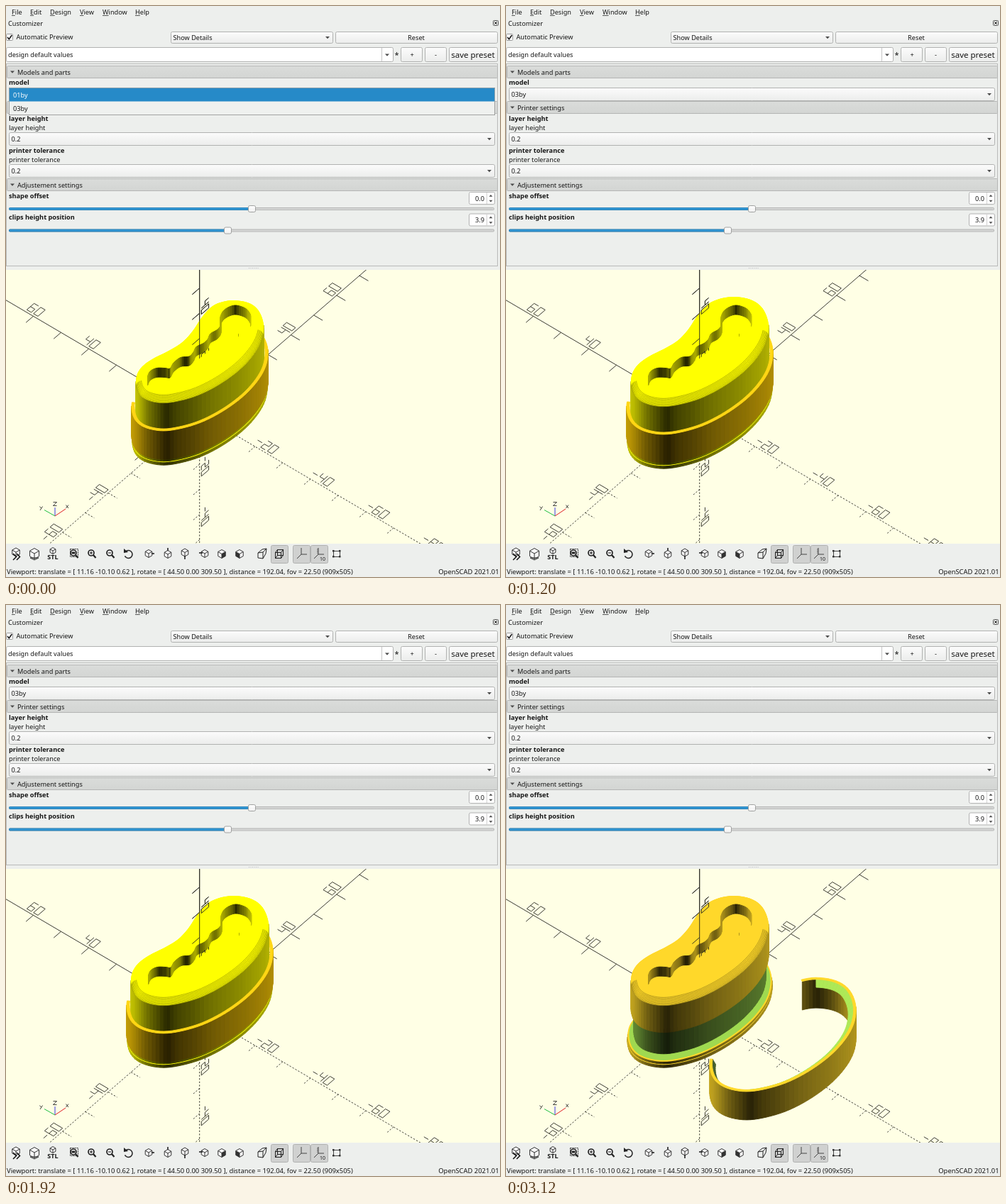
These frames come from a looping animation (696x805 px, 3.6 s). An HTML page with a canvas:

```html
<!DOCTYPE html>
<html lang="en">
<head>
<meta charset="utf-8">
<title>Customizer</title>
<style>
html, body { margin: 0; width: 100%; height: 100%; overflow: hidden; background: #edefed; }
canvas { display: block; }
</style>
</head>
<body>
<canvas id="stage" width="696" height="805"></canvas>
<script>
const ctx = document.getElementById('stage').getContext('2d');
const FONT = '"Noto Sans", "Open Sans", sans-serif';
const INK = '#161616', BLUE = '#268ac8', PANEL = '#edefed';

// ---------- drawing helpers ----------
function text(s, x, y, { size = 9.19, bold = false, color = INK, align = 'left' } = {}) {
  ctx.font = `${bold ? 'bold ' : ''}${size}px ${FONT}`;
  ctx.textAlign = align;
  ctx.fillStyle = color;
  ctx.fillText(s, x, y);
}
function rect(x, y, w, h, color) {
  ctx.fillStyle = color;
  ctx.fillRect(x, y, w, h);
}
function poly(pts, fill, stroke, width = 1, close = true) {
  ctx.beginPath();
  pts.forEach(([x, y], i) => i ? ctx.lineTo(x, y) : ctx.moveTo(x, y));
  if (close) ctx.closePath();
  if (fill) { ctx.fillStyle = fill; ctx.fill(); }
  if (stroke) { ctx.strokeStyle = stroke; ctx.lineWidth = width; ctx.stroke(); }
}
const line = (pts, color = INK, width = 1) => poly(pts, null, color, width, false);
function disc(x, y, r, fill, stroke, width = 1) {
  ctx.beginPath();
  ctx.arc(x, y, r, 0, 7);
  if (fill) { ctx.fillStyle = fill; ctx.fill(); }
  if (stroke) { ctx.strokeStyle = stroke; ctx.lineWidth = width; ctx.stroke(); }
}
function box(x, y, w, h, top, bottom = top, border = '#b1b2b1', r = 2) {
  const g = ctx.createLinearGradient(0, y, 0, y + h);
  g.addColorStop(0, top);
  g.addColorStop(1, bottom);
  ctx.beginPath();
  ctx.roundRect(x + .5, y + .5, w - 1, h - 1, r);
  ctx.fillStyle = g;
  ctx.fill();
  ctx.strokeStyle = border;
  ctx.lineWidth = 1;
  ctx.stroke();
}
const button = (x, y, w, h) => box(x, y, w, h, '#fcfcfc', '#ebeceb');
const arrow = (x, y, r = 3, d = 1) =>
  poly([[x - r, y - r * .5 * d], [x + r, y - r * .5 * d], [x, y + r * .6 * d]], '#4c4c4c');

// ---------- settings panel ----------
function combo(x, y, w, h, label) {
  button(x, y, w, h);
  text(label, x + 3.5, y + h / 2 + 3.5);
  arrow(x + w - 8, y + h / 2);
}
function header(y, label) {
  box(1, y, 692, 18, '#dadcda', '#d3d5d3', '#b4b5b4', 1);
  arrow(9, y + 9);
  text(label, 16, y + 12.5);
}
function slider(y, value, knob) {
  box(4, y - 2, 684, 4, '#d2d3d2', '#dcdddc', '#b4b5b4', 1);
  box(4, y - 2, knob - 4, 4, '#3ba3e0', BLUE, '#2b82b8', 1);
  box(knob - 5, y - 5, 11, 10, '#ffffff', '#f0f0f0', '#a0a1a0');
  box(652, y - 24, 37, 18, '#ffffff');
  line([[677.5, y - 23], [677.5, y - 7]], '#d0d0d0');
  text(value, 674, y - 11.5, { align: 'right' });
  arrow(683, y - 18.5, 2.5, -1);
  arrow(683, y - 11, 2.5);
}
function drawPanel(step) {
  rect(0, 0, 696, 372, PANEL);
  [['File', 8], ['Edit', 34], ['Design', 62], ['View', 104], ['Window', 136], ['Help', 182]]
    .forEach(([s, x]) => {
      text(s, x, 11.5);
      rect(x, 13, ctx.measureText(s[0]).width, .7, INK);
    });
  text('Customizer', 3, 27.5);
  box(686, 20, 8, 8, PANEL, PANEL, '#555', 1);
  line([[688, 22], [692, 26]]);
  line([[692, 22], [688, 26]]);

  box(0, 39, 10, 10, '#ffffff', '#ffffff', '#999', 1);
  line([[2, 44], [4.3, 46.7], [8.3, 41]], INK, 1.6);
  text('Automatic Preview', 14.5, 47.3);
  combo(232, 36, 229, 17, 'Show Details');
  button(464, 36, 229, 17);
  text('Reset', 578, 47.5, { align: 'center' });

  box(0, 58, 546, 21, '#ffffff');
  line([[529.5, 59], [529.5, 78]], '#c4c5c4');
  arrow(537, 69);
  text('design default values', 3, 72);
  text('*', 547.5, 73, { size: 11 });
  button(556, 58, 31, 21);
  button(590, 58, 31, 21);
  button(624, 58, 69, 21);
  text('+', 572, 72, { align: 'center' });
  text('-', 605.5, 72, { align: 'center' });
  text('save preset', 658, 73, { size: 11.5, align: 'center' });

  ctx.strokeStyle = '#b9bab9';
  ctx.lineWidth = 1;
  ctx.strokeRect(.5, 81.5, 692, 285);
  header(84, 'Models and parts');
  text('model', 4, 111.3, { bold: true });
  combo(4, 115, 685, 19, '03by');
  header(134, 'Printer settings');
  [['layer height', 162], ['printer tolerance', 207]].forEach(([s, y]) => {
    text(s, 4, y, { bold: true });
    text(s, 4, y + 13);
    combo(4, y + 16, 685, 19, '0.2');
  });
  header(243, 'Adjustement settings');
  text('shape offset', 4, 270.7, { bold: true });
  slider(286, '0.0', 346);
  text('clips height position', 4, 301.3, { bold: true });
  slider(316.5, '3.9', 312);
  for (let x = 342; x < 355; x += 2.5) rect(x, 369, 1, 1, '#bbb');

  if (step === 0) {
    rect(4, 115, 685, 39, '#8f908f');
    rect(4.8, 115.8, 683.4, 37.4, '#eff1ef');
    rect(4.8, 115.8, 683.4, 18.7, BLUE);
    text('01by', 10, 128.5, { color: '#fff' });
    text('03by', 10, 147.5);
  }
}

// ---------- axes, orthographic view ----------
const SQUASH = .7133, ORIGIN = [272.7, 575.1];
const X = [3.218, -2.785], Y = [-3.904, -2.296], Z = [0, -3.547];
const AXES = [{ dir: X, up: Y, read: 1 }, { dir: Y, up: X, read: -1 }, { dir: Z, up: X, read: -1 }];
const GLYPHS = { 0: '01540', 2: '013245', 4: '023 15', 6: '104532', 8: '01540 23', '-': '23' };
const AXIS_INK = '#25251f';
const at = ({ dir, up }, a, h) => [0, 1].map(k => ORIGIN[k] + dir[k] * a + up[k] * h);

function axisLabel(axis, value) {
  const chars = String(value), width = chars.length * 2.4 - .8;
  const low = value > 0 ? value - 1 : value + 1 - width;
  const start = axis.read > 0 ? low : low + width;
  [...chars].forEach((c, n) => GLYPHS[c].split(' ').forEach(run =>
    line([...run].map(v =>
      at(axis, start + axis.read * (n * 2.4 + v % 2 * 1.6), 4 - (v >> 1) * 1.6)), AXIS_INK, .9)));
}
function drawAxes() {
  for (const axis of AXES) for (const sign of [1, -1]) {
    const dash = sign > 0 ? [] : [2.3, 2.3];
    ctx.setLineDash(dash);
    line([at(axis, 0, 0), at(axis, sign * 190, 0)], AXIS_INK, .9);
    for (let i = 10; i < 190; i += 10) {
      ctx.setLineDash(dash);
      line([at(axis, sign * i, 0), at(axis, sign * i, -3.2)], AXIS_INK, .9);
      ctx.setLineDash([]);
      if (i % 20 === 0 && i < 100) axisLabel(axis, sign * i);
    }
  }
}
// The part of the vertical axis that stands out of the top face.
function drawAxisAboveModel() {
  const z = AXES[2];
  ctx.save();
  ctx.beginPath();
  [at(z, 22, -6), at(z, 22, 8), at(z, 70, 8), at(z, 70, -6)].forEach(p => ctx.lineTo(...p));
  ctx.clip();
  line([at(z, 22, 0), at(z, 70, 0)], AXIS_INK, .9);
  for (const i of [30, 40, 50]) line([at(z, i, 0), at(z, i, -3.2)], AXIS_INK, .9);
  axisLabel(z, 20);
  axisLabel(z, 40);
  ctx.restore();
}

// ---------- model ----------
const PER = 5;
function spline(pts, closed) {
  const n = pts.length, out = [];
  const get = i => pts[closed ? (i + n) % n : Math.max(0, Math.min(n - 1, i))];
  for (let i = 0; i < (closed ? n : n - 1); i++) for (let s = 0; s < PER; s++) {
    const t = s / PER, [a, b, c, d] = [-1, 0, 1, 2].map(k => get(i + k));
    out.push([0, 1].map(k => b[k] + .5 * t * (c[k] - a[k] +
      t * (2 * a[k] - 5 * b[k] + 4 * c[k] - d[k] + t * (3 * (b[k] - c[k]) + d[k] - a[k])))));
  }
  if (!closed) out.push(pts[n - 1]);
  return out;
}
function withNormals(pts, closed) {
  const n = pts.length;
  return pts.map(([x, y], i) => {
    const p = pts[closed ? (i + n - 1) % n : Math.max(0, i - 1)];
    const q = pts[closed ? (i + 1) % n : Math.min(n - 1, i + 1)];
    const tx = q[0] - p[0], ty = q[1] - p[1], len = Math.hypot(tx, ty) || 1;
    return { x, y, nx: -ty / len, ny: tx / len };
  });
}
const curve = (pts, closed) => withNormals(spline(pts.map(([x, y]) => [x, y / SQUASH]), closed), closed);
const bean = curve([
  [320, 417.5], [300, 421], [287, 428], [275, 441.5], [262, 461], [247, 477], [228, 489], [207, 499.5],
  [193, 509], [185, 519.5], [183, 532], [187, 546], [198, 555], [218, 559.5], [240, 557.5], [270, 549],
  [300, 534], [328, 514], [348, 493], [360, 472], [363, 450], [356, 431], [342, 421]], true);
const holeRim = curve([
  [199.5, 522], [203, 515], [212, 510.5], [224, 510.5], [231, 511], [236, 503], [246, 495.5], [258, 494],
  [264, 488], [268, 480.5], [278, 475.5], [284, 470], [288, 462], [298, 456], [303, 448], [302, 438],
  [308, 428], [322, 422], [337, 426], [344, 434], [344.5, 439]], false);

const LEFT_END = Math.round(9.35 * PER), RIGHT_END = Math.round(23.7 * PER);
const place = (p, off, drop) => [p.x + p.nx * off, (p.y + p.ny * off) * SQUASH + drop];
const loop = (off, drop) => bean.map(p => place(p, off, drop));
const shade = (rgb, p) => {
  const k = .15 + .58 * Math.abs(p.nx - .06);
  return `rgb(${rgb.map(v => Math.round(v * k))})`;
};
// Strip between two [offset, drop] profiles; color is a fixed fill or a base to shade.
function strip(pts, from, to, color, keep = () => true) {
  for (let i = 0; i + 1 < pts.length; i++) {
    const a = pts[i], b = pts[i + 1];
    if (!keep(a)) continue;
    const fill = typeof color === 'string' ? color : shade(color, a);
    poly([place(a, ...from), place(b, ...from), place(b, ...to), place(a, ...to)], fill, fill, .9);
  }
}
const wholeLoop = [...bean, bean[0]];
const clipArc = Array.from({ length: RIGHT_END - LEFT_END + 1 }, (_, i) => bean[(LEFT_END + i) % bean.length]);
const front = p => p.ny > -.05, back = p => p.ny <= .05;

const YELLOW = [255, 255, 0], AMBER = [255, 205, 8], GOLD = [255, 216, 42], GREEN = [129, 178, 66];
const CLIP_TOP = 35, CLIP_BOTTOM = 75;
const css = rgb => `rgb(${rgb})`;

function drawCap(grow, rgb) {
  const R = 9, layers = 8;
  for (let k = 0; k <= layers; k++) {
    const a = k / layers * Math.PI / 2;
    const off = grow - R * (1 - Math.cos(a)), drop = -R * .7 * Math.sin(a);
    poly(loop(off, drop), css(rgb));
    if (k < layers) {
      line(bean.filter(p => p.ny > .1).map(p => place(p, off, drop)), css(rgb.map(v => v * .6 | 0)), .7);
    }
  }
  ctx.save();
  if (grow) ctx.translate(1, 0);
  strip(holeRim, [0, 0], [0, 13], rgb);
  rect(327, 462, 1, 4, css(rgb.map(v => v * .7 | 0)));
  ctx.restore();
}
function drawClip(grow, keep) {
  strip(clipArc, [grow + 6, CLIP_TOP], [grow + 6, CLIP_BOTTOM], AMBER, p => front(p) && keep(p));
  strip(clipArc, [grow + 2, CLIP_TOP], [grow + 6, CLIP_TOP], '#ffd615', keep);
}
function drawLooseClip(grow) {
  const rim = [grow + 2.5, CLIP_TOP];
  ctx.save();
  ctx.translate(117, 82);
  strip(clipArc, [grow + 2, CLIP_TOP], [grow + 2, CLIP_BOTTOM], GOLD, back);
  strip(clipArc, rim, [grow - 5, CLIP_TOP + 6], '#aee957', p => p.nx > .05);
  strip(clipArc, rim, [grow - 2, CLIP_TOP + 7], '#46602e', p => p.nx <= -.25 && Math.abs(p.ny) < .6);
  strip(clipArc, [grow + 6, CLIP_TOP], [grow + 6, CLIP_BOTTOM], GOLD, front);
  strip(clipArc, rim, [grow + 6, CLIP_TOP], css(GOLD));
  ctx.restore();
}
function drawFlange(grow, rgb) {
  strip(wholeLoop, [grow + 5, 80], [grow + 5, 84], rgb, front);
  poly(loop(grow + 5, 80), css(rgb));
  strip(wholeLoop, [grow + 4.5, 76], [grow + 4.5, 79], rgb, front);
  poly(loop(grow + 4.5, 76), css(rgb));
}
function drawModel(step) {
  const grow = step ? 7 : 0, open = step === 2, rgb = open ? GOLD : YELLOW;
  drawFlange(grow, rgb);
  if (open) {
    poly(loop(grow + 2.5, 75.5), '#9fd950');
    strip(wholeLoop, [grow - 4, 36], [grow - 4, 71], GREEN, front);
  } else {
    drawClip(grow, () => true);
  }
  strip(wholeLoop, [grow, 0], [grow, open ? 38 : 60], rgb, front);
  drawCap(grow, rgb);
  if (open) drawLooseClip(grow);
  else drawClip(grow, front);
}
function drawGizmo() {
  line([[69, 719], [69, 707]], '#3a3ae0');
  line([[69, 719], [84, 709]], '#e02020');
  line([[69, 719], [54, 710.5]], '#20c040');
  line([[66.5, 699.5], [71.5, 699.5], [66.5, 704.5], [71.5, 704.5]], INK, .8);
  line([[84.5, 703.5], [88, 708]], INK, .8);
  line([[88, 703.5], [84.5, 708]], INK, .8);
  line([[47.5, 705.5], [49.5, 708]], INK, .8);
  line([[51.5, 705.5], [48, 711]], INK, .8);
}
function drawView(step) {
  ctx.save();
  ctx.beginPath();
  ctx.rect(0, 372, 696, 386);
  ctx.clip();
  rect(0, 372, 696, 386, '#ffffe5');
  drawAxes();
  drawModel(step);
  drawAxisAboveModel();
  drawGizmo();
  ctx.restore();
}

// ---------- toolbar ----------
function cube(x, y, r, side) {
  const w = r * .87, h = r / 2;
  poly([[x, y - r], [x + w, y - h], [x + w, y + h], [x, y + r], [x - w, y + h], [x - w, y - h]], '#f7f7f7', '#333');
  if (side === 'right') poly([[x, y], [x + w, y - h], [x + w, y + h], [x, y + r]], '#333');
  if (side === 'left') poly([[x, y], [x - w, y - h], [x - w, y + h], [x, y + r]], '#333');
  line([[x - w, y - h], [x, y], [x + w, y - h]], '#333');
  line([[x, y], [x, y + r]], '#333');
}
function lens(x, mark) {
  line([[x + 2, 774], [x + 5.5, 778]], '#222', 2.2);
  disc(x - 1, 771, 4, '#f7f7f7', '#222', 1.7);
  if (mark === 'all') rect(x - 3.5, 769.5, 5, 3, '#222');
  else line([[x - 3.2, 771], [x + 1.2, 771]], '#222', 1.1);
  if (mark === '+') line([[x - 1, 768.8], [x - 1, 773.2]], '#222', 1.1);
}
function drawToolbar() {
  rect(0, 758, 696, 47, PANEL);
  for (const x of [373, 404, 429]) box(x, 760, 25, 26, '#d0d1d0', '#d0d1d0', '#b0b1b0');
  cube(14, 770, 6);
  for (const x of [10, 15]) line([[x, 772], [x + 4.5, 776.5], [x, 781]], '#111', 1.5);
  cube(40, 772, 7.5);
  line([[34, 778], [46, 778], [40, 781], [34, 778]], '#333');
  cube(66, 768, 4.5);
  text('STL', 66, 780, { size: 9, bold: true, align: 'center' });
  lens(96, 'all');
  ctx.setLineDash([2, 1]);
  ctx.strokeStyle = '#333';
  ctx.lineWidth = 1;
  ctx.strokeRect(90.5, 765.5, 11, 11);
  ctx.setLineDash([]);
  lens(121, '+');
  lens(147, '-');
  ctx.beginPath();
  ctx.arc(172.5, 773, 5.5, -2.4, 2.7);
  ctx.strokeStyle = '#222';
  ctx.lineWidth = 1.5;
  ctx.stroke();
  poly([[166, 765], [166, 771], [172, 770]], '#222');

  cube(201, 772, 5.5);
  line([[205, 772], [209, 772]], '#222', 1.6);
  cube(228, 773, 5.5);
  line([[228, 764], [228, 768]], '#222', 1.6);
  cube(252, 770.5, 5.5);
  line([[252, 775], [252, 780]], '#222', 1.6);
  cube(280, 772, 5.5);
  line([[272, 771], [277, 771]], '#222', 1.6);
  cube(304, 772.5, 6, 'right');
  cube(329, 772.5, 6, 'left');

  poly([[355, 771], [362, 770], [362, 779], [355, 778]], null, '#222');
  line([[355, 771], [361, 766], [367, 765], [366, 772], [362, 779]], '#222');
  line([[362, 770], [367, 765]], '#222');
  ctx.strokeRect(379.5, 770.5, 8, 8);
  ctx.strokeRect(382.5, 766.5, 8, 8);
  [[379.5, 770.5], [387.5, 770.5], [379.5, 778.5], [387.5, 778.5]]
    .forEach(([x, y]) => line([[x, y], [x + 3, y - 4]], '#222'));
  for (const x of [416, 440]) {
    line([[x, 764], [x, 773], [x - 6, 779]], '#444');
    line([[x, 773], [x + 8, 773]], '#444');
  }
  for (let y = 766; y < 773; y += 2.5) line([[438, y], [440, y]], '#444', .8);
  text('10', 442, 782, { size: 7 });
  ctx.lineWidth = 1;
  ctx.strokeRect(461.5, 768.5, 9, 8);
  for (const x of [460, 469]) for (const y of [767, 775]) rect(x, y, 2.5, 2.5, '#333');
  text('Viewport: translate = [ 11.16 -10.10 0.62 ], rotate = [ 44.50 0.00 309.50 ], distance = 192.04, fov = 22.50 (909x505)',
    1, 800.5, { size: 9.4 });
  text('OpenSCAD 2021.01', 694.5, 800.5, { size: 9.4, align: 'right' });
}

// ---------- timeline ----------
const STEP_MS = 1200, STEPS = 3;
let shown = -1;
const begin = performance.now();
function tick() {
  const step = Math.floor((performance.now() - begin) / STEP_MS) % STEPS;
  if (step !== shown) {
    shown = step;
    drawPanel(step);
    drawView(step);
    drawToolbar();
  }
  requestAnimationFrame(tick);
}
tick();
</script>
</body>
</html>
```
